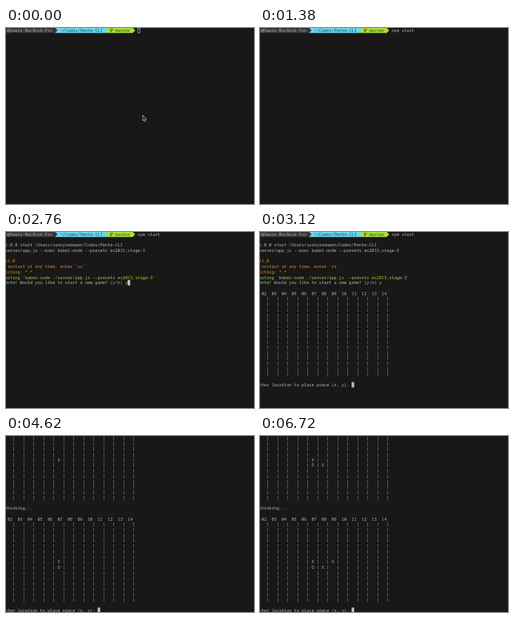
These frames come from a looping animation (310x220 px, 8000 ms). An HTML page with a canvas:

```html
<!DOCTYPE html>
<html lang="en">
<head>
<meta charset="utf-8">
<title>Terminal board game</title>
<style>
  html, body { margin: 0; width: 100%; height: 100%; overflow: hidden; background: #181818; }
  canvas { display: block; width: 310px; height: 220px; }
</style>
</head>
<body>
<canvas id="stage" width="310" height="220"></canvas>
<script>
const ctx = document.getElementById('stage').getContext('2d');
const LOOP = 8000, ROWS = 33;
// Text grid: drawn in units of 10 per column, then scaled down.
const SCALE = 0.313, LEFT = -1.25, TOP = -0.36;
const COL = 10, ROW = 21.45, BASE = 16.7;
const BG = '#181818', FG = '#b4b4b4', CURSOR = '#c4c4c4', ORANGE = '#d68a28', GREEN = '#a0cc3a';
const ASK = 'nter location to place piece (x, y): ';
const lineColors = { 5: ORANGE, 6: ORANGE, 7: ORANGE, 8: GREEN };

const segments = [
  { from: -1, to: 20, bg: '#363636', fg: '#a8a8a8', col: 0, text: 'n@Owens-MacBook-Pro' },
  { from: 20, to: 40, bg: '#69d8f0', fg: '#26424a', col: 22, text: '~/Codes/Pente-CLI' },
  { from: 40, to: 51, bg: '#aade3b', fg: '#3a4a16', col: 44, text: 'master' }
];

function board(pieces) {
  const cols = Array.from({ length: 13 }, (_, i) => i + 2);
  const rows = [cols.map(c => ' ' + String(c).padStart(2, '0') + ' ').join('')];
  for (let y = 0; y < 15; y++)
    rows.push(cols.map(x => ` ${pieces[x + ',' + y] || ' '} |`).join(''));
  return rows.join('\n') + '\n\n';
}

const boards = [
  {},
  { '7,7': 'X' },
  { '7,7': 'X', '7,8': 'O' },
  { '7,7': 'X', '7,8': 'O', '8,8': 'X' },
  { '7,7': 'X', '7,8': 'O', '8,8': 'X', '9,7': 'O' }
].map(board);

// Everything the terminal has printed by time t.
function output(t) {
  let out = ' '.repeat(53);
  const say = (at, text) => { if (t >= at) out += text; };
  const type = (at, step, text) => [...text].forEach((ch, i) => say(at + i * step, ch));
  const think = (at, text) => say(at, '\n\n' + text + 'thinking...\n\n');

  type(600, 82, 'npm start');
  say(1380, '\n');
  say(1680, '\n1.0.0 start /Users/sunnyredowen/Codes/Pente-CLI\n' +
    'server/app.js --exec babel-node --presets es2015,stage-3\n');
  say(1980, '\n11.0\n restart at any time, enter `rs`\ntching: *.*\n');
  say(2100, 'arting `babel-node ./server/app.js --presets es2015,stage-3`\n');
  say(2400, 'ente! Would you like to start a new game? (y/n) ');
  say(2640, 'y');
  say(2940, '\n\n' + boards[0] + ASK);
  type(3420, 180, '7,7');
  think(3960, boards[1]);
  say(4560, boards[2]);
  say(4620, ASK);
  type(5700, 120, '8,8');
  think(6120, boards[3]);
  say(6720, boards[4] + ASK);
  return out.split('\n');
}

function write(text, col, row, color) {
  ctx.fillStyle = color;
  ctx.fillText(text, col * COL, row * ROW + BASE);
}

function path(points) {
  ctx.beginPath();
  points.forEach(([x, y]) => ctx.lineTo(x, y));
}

function drawPrompt() {
  for (const s of [...segments].reverse()) {
    const start = s.from * COL, end = s.to * COL;
    path([[start, 0], [end, 0], [end + COL, ROW / 2], [end, ROW], [start, ROW]]);
    ctx.fillStyle = s.bg;
    ctx.fill();
  }
  for (const s of segments) write(s.text, s.col, 0, s.fg);
  // branch mark
  ctx.strokeStyle = '#2c3a10';
  ctx.lineWidth = 2.4;
  path([[422, 3], [422, 19]]);
  ctx.stroke();
  path([[422, 14], [429, 10], [429, 4]]);
  ctx.stroke();
}

function drawCursor(col, row, hollow) {
  if (hollow) {
    ctx.strokeStyle = CURSOR;
    ctx.lineWidth = 2;
    ctx.strokeRect(col * COL + 1, row * ROW + 2, COL - 2, ROW - 3);
  } else {
    ctx.fillStyle = CURSOR;
    ctx.fillRect(col * COL, row * ROW, COL, ROW);
  }
}

function drawPointer(t) {
  if (t < 360) {
    path([[171, 109], [171, 115.8], [172.5, 114.5], [173.5, 116.8],
      [174.6, 116.3], [173.6, 114.1], [175.5, 114]]);
    ctx.closePath();
    ctx.fillStyle = '#000';
    ctx.fill();
    ctx.strokeStyle = '#ddd';
    ctx.lineWidth = 0.7;
    ctx.stroke();
  } else if (t < 600) {
    ctx.fillStyle = '#aaa';
    ctx.fillRect(171, 108, 0.8, 6);
  }
}

function draw(t) {
  ctx.setTransform(1, 0, 0, 1, 0, 0);
  ctx.fillStyle = BG;
  ctx.fillRect(0, 0, 310, 220);
  drawPointer(t);

  ctx.setTransform(SCALE, 0, 0, SCALE, LEFT, TOP);
  ctx.font = '16.667px "Noto Sans Mono", "DejaVu Sans Mono", monospace';
  const lines = output(t);
  const top = Math.max(0, lines.length - ROWS);
  if (!top) drawPrompt();
  lines.slice(top).forEach((line, i) => write(line, 0, i, lineColors[i + top] || FG));

  // On an empty line the cursor sits left of the visible area.
  const last = lines[lines.length - 1];
  if (last) drawCursor(last.length, lines.length - 1 - top, t < 360);
}

function frame(now) {
  draw(now % LOOP);
  requestAnimationFrame(frame);
}
draw(0);
requestAnimationFrame(frame);
</script>
</body>
</html>
```
